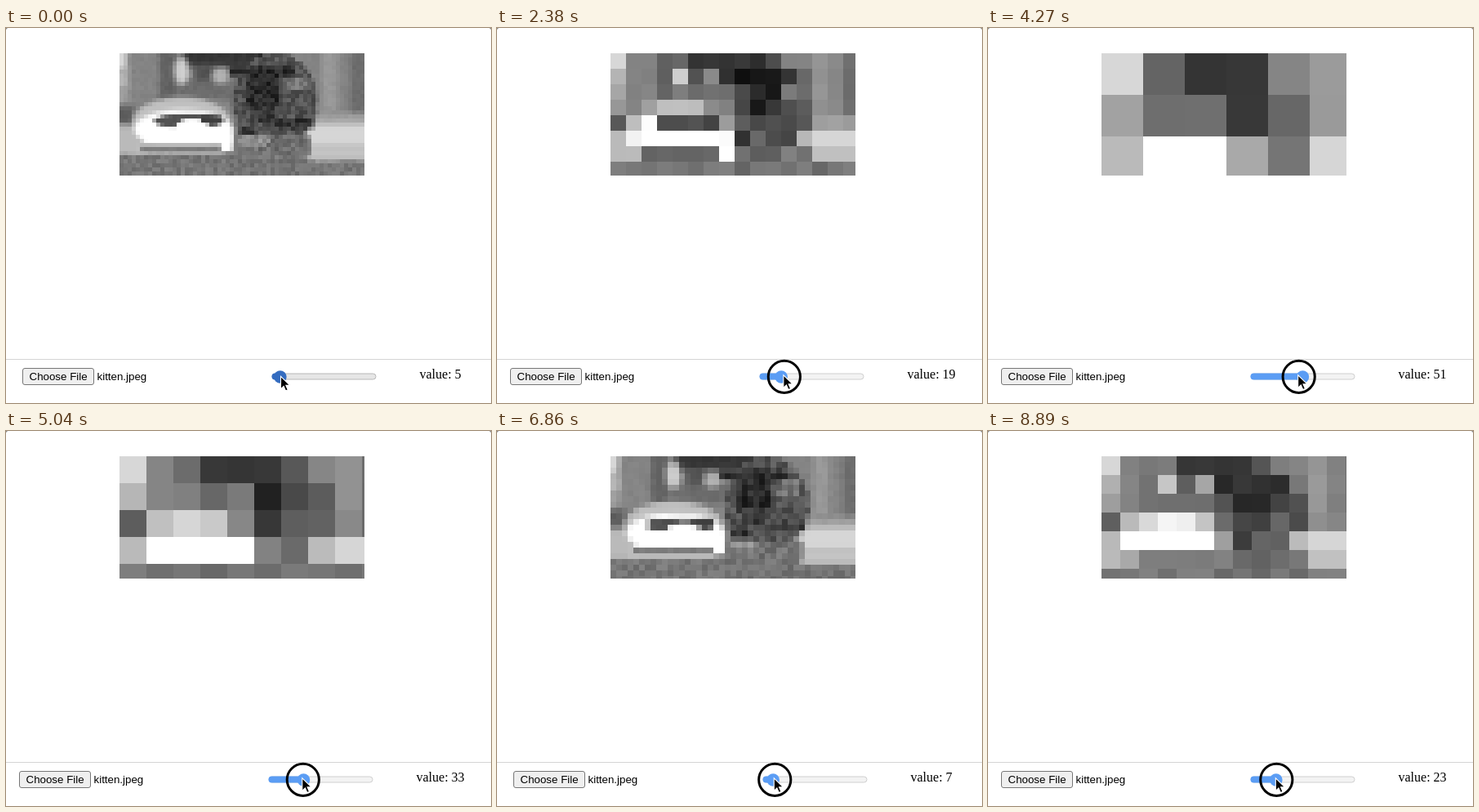
Animation of 594 by 460 pixels, one loop 8960 ms. Source, as an HTML page with a canvas:

```html
<!DOCTYPE html>
<html lang="en">
<head>
<meta charset="utf-8">
<title>Pixelate</title>
<style>
  html, body { margin: 0; width: 594px; height: 460px; overflow: hidden; background: #fff; }
  canvas { position: absolute; left: 139px; top: 31px; }
  svg { position: absolute; left: 0; top: 0; }
  .ui { font: 13.333px Arial, "Liberation Sans", sans-serif; }
  .value { font: 16px Times, "Liberation Serif", serif; }
</style>
</head>
<body>
<canvas id="view" width="300" height="150"></canvas>
<svg width="594" height="460">
  <path d="M0 0h2L0 2zM594 0h-2l2 2z" fill="#888"/>
  <path d="M0 406.5H594" stroke="#d4d4d4"/>
  <g id="bar">
    <rect x="16.5" y="417.5" width="87" height="20" rx="2.5" fill="#efefef" stroke="#767676"/>
    <text class="ui" x="24.5" y="432">Choose File</text>
    <text class="ui" x="107.5" y="432">kitten.jpeg</text>
    <rect id="track" x="322" y="424" width="127" height="7" rx="3.5"/>
    <rect id="fill" x="321.5" y="423.5" height="8" rx="4"/>
    <circle id="thumb" cy="428" r="7.8"/>
    <text class="value" id="label" x="502.5" y="430"></text>
  </g>
  <g id="pointer">
    <circle id="ring" r="19.6" fill="none" stroke="#000" stroke-width="3"/>
    <path d="M-1 -2v15.5l3.6-3.4 2.4 5.6 2.7-1.1-2.4-5.5h5z" fill="#000" stroke="#fff" stroke-width="1.1"/>
  </g>
</svg>
<script>
const LOOP = 8960, STEP = 70, W = 300, H = 150;
const $ = id => document.getElementById(id);
const set = (id, attrs) => {
  for (const k in attrs) $(id).setAttribute(k, attrs[k]);
};

// Slider value over time: [ms, value]
const path = [
  [0, 5], [70, 6], [1120, 14], [1470, 14], [2100, 17], [2170, 17], [2380, 19],
  [2660, 30], [3290, 75], [3500, 89], [3710, 89], [4270, 51], [4410, 42],
  [5530, 26], [5740, 9], [5810, 3], [5880, 3], [6090, 5], [6440, 5], [6510, 4],
  [6650, 4], [7420, 16], [7560, 16], [7630, 16.6], [7700, 16.6], [7980, 20],
  [8400, 20], [8890, 23], [LOOP, 23]
];

function valueAt(t) {
  const i = path.findIndex(p => p[0] >= t);
  if (i < 1) return path[0][1];
  const [t0, a] = path[i - 1], [t1, b] = path[i];
  return a + (b - a) * (t - t0) / (t1 - t0);
}

const thumbX = v => 329.5 + (v - 3) * 1.165;

function hash(x, y) {
  const s = Math.sin(x * 12.99 + y * 78.23) * 43758.55;
  return s - Math.floor(s) - 0.5;
}

// Simplified grey scene: a dark kitten beside a white bowl.
function paintScene() {
  const c = document.createElement('canvas');
  c.width = W;
  c.height = H;
  const g = c.getContext('2d', { willReadFrequently: true });
  const tone = v => { g.fillStyle = `rgb(${v},${v},${v})`; };
  const box = (v, x, y, w, h) => { tone(v); g.fillRect(x, y, w, h); };
  const oval = (v, x, y, rx, ry) => {
    tone(v);
    g.beginPath();
    g.ellipse(x, y, rx, ry, 0, 0, 7);
    g.fill();
  };
  box(132, 0, 0, W, H);

  // backdrop
  g.filter = 'blur(3px)';
  box(216, -9, -9, 16, 28);
  box(182, -9, 18, 18, 24);
  box(160, -9, 40, 18, 20);
  box(98, 47, -9, 22, 64);
  box(108, 68, 30, 70, 24);
  box(54, 76, -9, 112, 24);
  box(80, 90, 14, 24, 18);
  oval(208, 74, 20, 9, 17);
  oval(178, 122, 26, 11, 10);
  box(152, 245, -9, 20, 78);
  box(108, 281, -9, 30, 83);
  box(162, 238, 72, 80, 14);
  box(214, 226, 84, 90, 30);
  box(196, 226, 111, 90, 19);
  box(92, -9, 63, 24, 22);
  box(186, -9, 86, 40, 38);

  // kitten
  g.filter = 'blur(1.5px)';
  oval(84, 188, 56, 52, 58);
  box(118, 203, 26, 24, 18);
  box(36, 132, 15, 80, 11);
  box(42, 153, 22, 42, 42);
  box(58, 160, 62, 28, 22);
  box(48, 188, 78, 48, 12);
  box(112, 140, 100, 92, 22);
  oval(150, 162, 106, 20, 7);

  // bowl
  g.filter = 'blur(2px)';
  oval(192, 74, 82, 60, 30);
  oval(255, 76, 91, 60, 24);
  box(255, 28, 88, 108, 22);
  g.filter = 'blur(1px)';
  oval(80, 83, 81, 43, 9);
  oval(255, 87, 92, 22, 14);
  box(62, 98, 75, 24, 8);
  box(190, 20, 109, 106, 12);
  box(92, 24, 112, 98, 4);
  box(255, 122, 96, 14, 22);
  box(42, 145, 89, 20, 9);

  // ground
  box(118, -9, 122, 150, 40);
  box(114, 130, 125, 100, 40);
  box(116, 225, 131, 90, 30);

  const data = g.getImageData(0, 0, W, H).data;
  return (x, y) => {
    const fur = Math.hypot((x - 188) / 53, (y - 60) / 64) < 1;
    const base = data[(y * W + x) * 4];
    const amp = base > 180 ? 0 : y > 122 ? 28 : fur ? 44 : 8;
    return Math.round(base + amp * hash(x, y));
  };
}

const shade = paintScene();
const view = $('view').getContext('2d');
let shown = 0;

function pixelate(size) {
  if (size === shown) return;
  shown = size;
  for (let y = 0; y < H; y += size) {
    for (let x = 0; x < W; x += size) {
      const v = shade(x, y);
      view.fillStyle = `rgb(${v},${v},${v})`;
      view.fillRect(x, y, size, size);
    }
  }
}

function render(time) {
  const t = Math.floor(time % LOOP / STEP) * STEP;
  const value = Math.round(valueAt(t));
  const shift = value < 10 ? 4 : 0;
  const pressed = t > 0;
  const x = thumbX(value);
  const blue = pressed ? '#5b9df4' : '#346cc0';

  pixelate(value);
  $('label').textContent = 'value: ' + value;
  set('bar', { transform: `translate(${shift})` });
  set('track', pressed ? { fill: '#f3f3f3', stroke: '#cfcfcf' } : { fill: '#e6e6e6', stroke: '#b8b8b8' });
  set('fill', { width: x - 321.5, fill: blue });
  set('thumb', { cx: x, fill: blue });
  // the pointer runs one step ahead of the thumb
  const px = thumbX(valueAt(t + STEP)) + shift + 0.5;
  set('pointer', { transform: `translate(${px} ${pressed ? 427.8 : 429.3})` });
  set('ring', { visibility: pressed ? 'visible' : 'hidden' });
}

const start = performance.now();
function tick() {
  render(performance.now() - start);
  requestAnimationFrame(tick);
}
tick();
</script>
</body>
</html>
```
